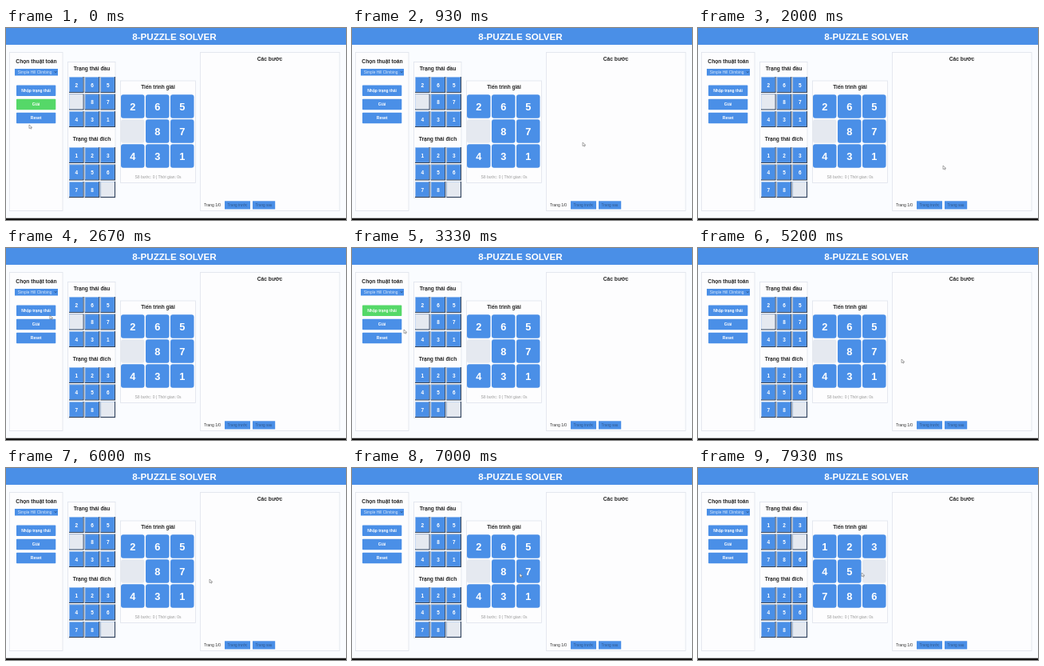
Recreate the animation shown at these times as an HTML page. Size 426x240 px, loop 8 s.

```html
<!DOCTYPE html>
<html lang="vi">
<head>
<meta charset="utf-8">
<title>8-Puzzle Solver</title>
<style>
  html, body { margin: 0; width: 100%; height: 100%; overflow: hidden; background: #fafcff; }
  svg { display: block; width: 100%; height: 100%; }
  text { font-family: "Liberation Sans", Arial, sans-serif; text-anchor: middle; }
</style>
</head>
<body>
<svg id="stage" viewBox="0 0 426 240"></svg>
<script>
const BLUE = '#4a8fe7', GREEN = '#55d868', EMPTY = '#e5e9f0';
const LOOP = 8000, SOLVE_AT = 7400;
const START = '265087431', RESULT = '123450786', GOAL = '123456780';
const stage = document.getElementById('stage');

function add(tag, attrs, content = '') {
  const node = document.createElementNS('http://www.w3.org/2000/svg', tag);
  for (const key in attrs) node.setAttribute(key, attrs[key]);
  node.textContent = content;
  return stage.appendChild(node);
}
const rect = (x, y, width, height, fill, more = {}) =>
  add('rect', { x, y, width, height, fill, ...more });
const label = (content, x, y, size, fill = '#222', weight = 'bold') =>
  add('text', { x, y, 'font-size': size, fill, 'font-weight': weight }, content);
const panel = (x, y, w, h) =>
  rect(x, y, w, h, '#fdfdfe', { stroke: '#dfe3ec', 'stroke-width': 0.8 });

function button(content, y) {
  const face = rect(13, y, 49.3, 13.5, BLUE, { rx: 0.8 });
  label(content, 37.6, y + 8.6, 5, '#fff');
  return face;
}

// Returns a function that shows a nine-digit state, with 0 as the gap.
function board(left, top, stepX, stepY, w, h, fontSize, raised) {
  const cells = Array.from({ length: 9 }, (_, i) => {
    const x = left + i % 3 * stepX, y = top + Math.floor(i / 3) * stepY;
    if (raised) {
      rect(x, y, w, h, '#34445c');
      rect(x, y, w - 1.2, h - 1.2, '#b9d2f2');
    }
    const face = raised ? rect(x + 0.7, y + 0.7, w - 1.9, h - 1.9, BLUE)
                        : rect(x, y, w, h, BLUE, { rx: 3 });
    const digit = label('', x + w / 2, y + h / 2 + fontSize * 0.42, fontSize, '#fff');
    return { face, digit };
  });
  return state => cells.forEach(({ face, digit }, i) => {
    const gap = state[i] === '0';
    face.setAttribute('fill', gap ? EMPTY : BLUE);
    digit.textContent = gap ? '' : state[i];
  });
}

rect(0, 0, 426, 240, '#fafcff');
rect(0, 0, 426, 21, BLUE);
label('8-PUZZLE SOLVER', 211, 14.8, 11.6, '#fff');
rect(0, 237.7, 426, 2.3, '#141414');

panel(4.5, 30.5, 66.5, 198);
label('Chọn thuật toán', 38, 44.3, 6.7);
rect(11, 51, 54, 8.5, BLUE);
label('Simple Hill Climbing', 36, 57, 4.8, '#dce9fa', 'normal');
add('path', { d: 'M61 54.3l1.2 1.4 1.2-1.4', fill: 'none', stroke: '#22344e', 'stroke-width': 0.7 });
const inputButton = button('Nhập trạng thái', 71.6);
const solveButton = button('Giải', 88.8);
button('Reset', 105.8);

panel(77.5, 42.5, 59.5, 170);
label('Trạng thái đầu', 107.5, 53, 6.7);
const showStart = board(79, 61, 19.7, 21.5, 18.6, 20, 6.5, true);
label('Trạng thái đích', 107.5, 141, 6.7);
board(79, 149, 19.7, 21.5, 18.6, 20, 6.5, true)(GOAL);

panel(143.5, 66, 94, 127.5);
label('Tiến trình giải', 190.5, 76.3, 6.5);
const showProgress = board(144, 83.2, 31, 31, 29.5, 29.5, 12.8, false);
label('Số bước: 0 | Thời gian: 0s', 190.5, 187.7, 5, '#999', 'normal');

panel(243.5, 30.5, 174.5, 198);
label('Các bước', 330.5, 41, 6.7);
label('Trang 1/0', 258.5, 223.2, 5, '#333', 'normal');
rect(274, 216.3, 32, 10.2, BLUE);
label('Trang trước', 290, 223, 4.7, '#2f568a', 'normal');
rect(309, 216.3, 28.2, 10.2, BLUE);
label('Trang sau', 323, 223, 4.7, '#2f568a', 'normal');

const cursor = add('path', {
  d: 'M0 0V4.6L1.2 3.6 2.1 5.2 2.9 4.8 2.2 3.3H3.7Z',
  fill: '#fff', stroke: '#555', 'stroke-width': 0.5
});

// Pointer stops: time, x, y
const stops = [
  [0, 29, 121], [500, 289, 143], [1200, 289, 143], [1500, 307, 172], [2200, 307, 172],
  [2750, 40, 79], [3200, 46, 82], [3330, 65, 102], [3800, 255, 139],
  [6600, 255, 139], [7100, 205, 131], [8000, 205, 131]
];

function pointerAt(t) {
  const i = stops.findIndex(stop => stop[0] > t);
  const [t0, x0, y0] = stops[i - 1], [t1, x1, y1] = stops[i];
  const p = (t - t0) / (t1 - t0), ease = p * p * (3 - 2 * p);
  return [x0 + (x1 - x0) * ease, y0 + (y1 - y0) * ease];
}

function draw(now) {
  const t = now % LOOP;
  const state = t < SOLVE_AT ? START : RESULT;
  showStart(state);
  showProgress(state);
  solveButton.setAttribute('fill', t < 70 ? GREEN : BLUE);
  inputButton.setAttribute('fill', t >= 2700 && t < 3400 ? GREEN : BLUE);
  cursor.setAttribute('transform', `translate(${pointerAt(t)})`);
}

const startTime = performance.now();
function frame() {
  draw(performance.now() - startTime);
  requestAnimationFrame(frame);
}
frame();
</script>
</body>
</html>
```
